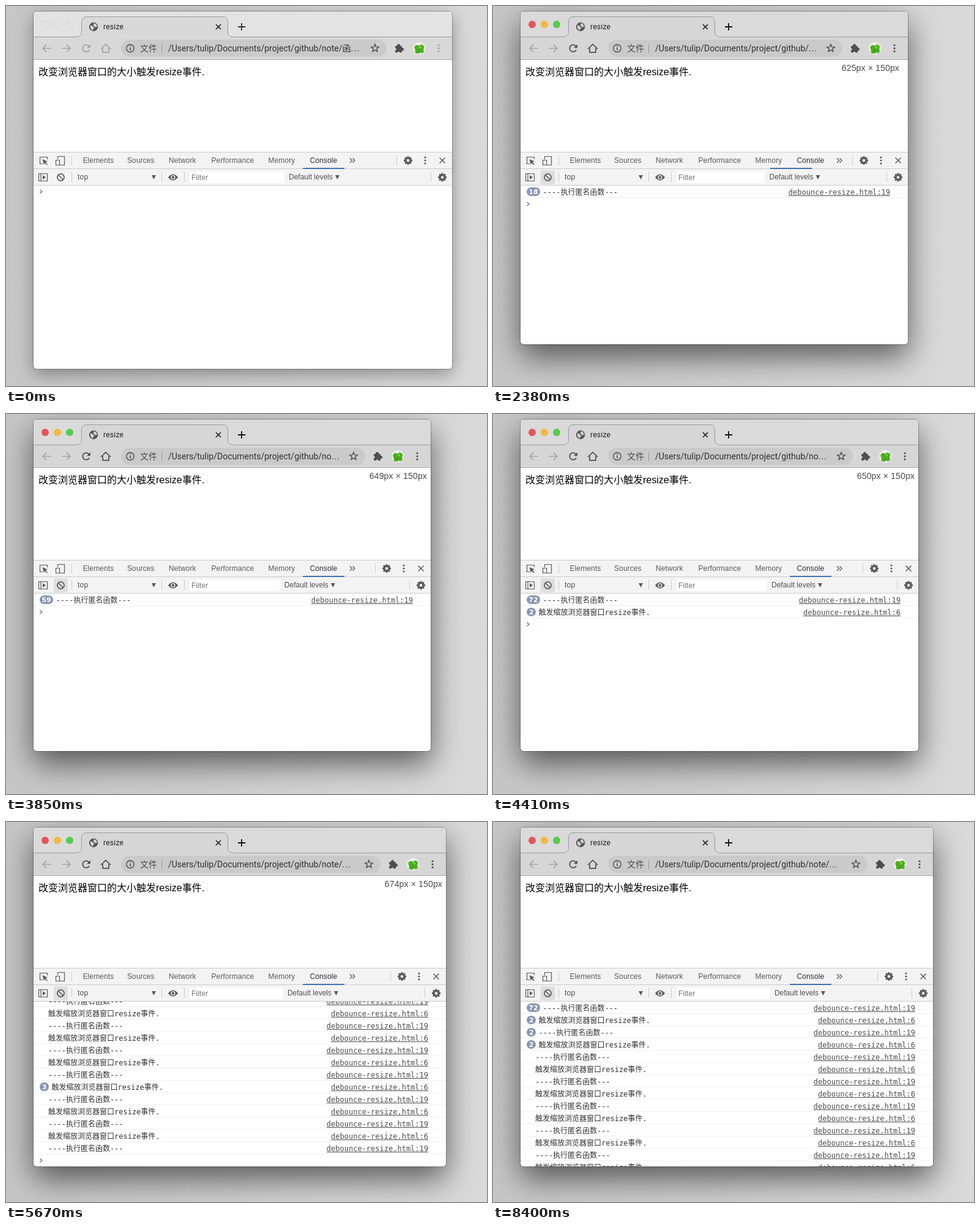
These frames come from a looping animation (786 px wide and 620 px high, 8.47 s). An HTML page with a canvas:

```html
<!DOCTYPE html>
<html lang="zh">
<head>
<meta charset="utf-8">
<title>resize</title>
<style>
html, body { margin: 0; width: 786px; height: 620px; overflow: hidden; background: #cfcfcf; }
canvas { display: block; }
</style>
</head>
<body>
<canvas id="stage" width="786" height="620"></canvas>
<script>
const ctx = document.getElementById('stage').getContext('2d');
const LOOP = 8470, STEP = 70, TAU = Math.PI * 2;
const LEFT = 45, TOP = 9, LIST = 293, ROW = 20;
const CJK = '"Noto Sans CJK SC", "Noto Sans CJK", sans-serif';
const UI = 'Roboto, ' + CJK;
const SANS = '"Liberation Sans", ' + CJK;
const MONO = '"DejaVu Sans Mono", "Noto Sans CJK SC", "Noto Sans CJK", monospace';
const PATH = '/Users/tulip/Documents/project/github/note/函数防抖';

// [time, value] pairs, straight between them
const RIGHT = [[1680, 729], [2030, 640], [2380, 678], [2660, 702], [3200, 688], [3710, 694], [3850, 694], [4550, 695], [4900, 710], [5600, 719]];
const BOTTOM = [[1680, 592], [2030, 556], [2380, 552], [3850, 550], [4550, 550], [4900, 555], [5600, 562]];
const CALLS = [[1680, 0], [2380, 18], [3850, 59], [4270, 72]];
const SCROLL = [[6230, 231], [6580, 93], [6930, 0]];
const BADGES = { 1: 2, 2: 2, 3: 2, 15: 3 };
const ROWS = 24;

const clamp = v => Math.max(0, Math.min(1, v));

function track(keys, t) {
  if (t <= keys[0][0]) return keys[0][1];
  for (let i = 1; i < keys.length; i++) {
    const [t0, a] = keys[i - 1], [t1, b] = keys[i];
    if (t <= t1) return a + (b - a) * (t - t0) / (t1 - t0);
  }
  return keys[keys.length - 1][1];
}

function text(s, x, y, font, color, align = 'left', gap = 0) {
  ctx.font = font;
  ctx.fillStyle = color;
  ctx.textAlign = align;
  ctx.letterSpacing = gap + 'px';
  ctx.fillText(s, x, y);
  ctx.letterSpacing = '0px';
}

function rect(x, y, w, h, color) {
  ctx.fillStyle = color;
  ctx.fillRect(x, y, w, h);
}

function round(x, y, w, h, r, color) {
  ctx.beginPath();
  ctx.roundRect(x, y, w, h, r);
  ctx.fillStyle = color;
  ctx.fill();
}

function dot(x, y, r, color) {
  ctx.beginPath();
  ctx.arc(x, y, r, 0, TAU);
  ctx.fillStyle = color;
  ctx.fill();
}

function ring(x, y, r, color, w, from = 0, to = TAU) {
  ctx.beginPath();
  ctx.arc(x, y, r, from, to);
  ctx.strokeStyle = color;
  ctx.lineWidth = w;
  ctx.stroke();
}

// flat list of coordinates
function trace(p, close) {
  ctx.beginPath();
  for (let i = 0; i < p.length; i += 2) ctx.lineTo(p[i], p[i + 1]);
  if (close) ctx.closePath();
}

function line(p, color, w, close) {
  trace(p, close);
  ctx.strokeStyle = color;
  ctx.lineWidth = w;
  ctx.stroke();
}

function poly(p, color) {
  trace(p, true);
  ctx.fillStyle = color;
  ctx.fill();
}

function cross(x, y, r, color, w) {
  line([x - r, y - r, x + r, y + r], color, w);
  line([x - r, y + r, x + r, y - r], color, w);
}

function kebab(x, y, color) {
  for (let i = -1; i < 2; i++) dot(x, y + i * 5, 1.6, color);
}

function gear(x, y) {
  const c = '#5c5c5c';
  ring(x, y, 4, c, 3.4);
  for (let i = 0; i < 8; i++) {
    const a = i * TAU / 8, dx = Math.cos(a), dy = Math.sin(a);
    line([x + dx * 5, y + dy * 5, x + dx * 7, y + dy * 7], c, 2.8);
  }
}

function star(x, y, color) {
  const p = [];
  for (let i = 0; i < 10; i++) {
    const a = i * TAU / 10 - TAU / 4, r = i % 2 ? 2.9 : 6.6;
    p.push(x + r * Math.cos(a), y + r * Math.sin(a));
  }
  line(p, color, 1.4, true);
}

function arrow(x, y, dir, color) {
  line([x - 6.5, y, x + 6.5, y], color, 1.7);
  line([x + dir, y - 6, x + dir * 6.8, y, x + dir, y + 6], color, 1.7);
}

function backdrop() {
  const g = ctx.createLinearGradient(0, 0, 786, 0);
  g.addColorStop(0, '#c6c6c6');
  g.addColorStop(0.5, '#d0d0d0');
  g.addColorStop(1, '#dadada');
  rect(0, 0, 786, 620, g);
}

function frame(R, B, active) {
  const w = R - LEFT, h = B - TOP;
  ctx.save();
  ctx.shadowColor = active ? 'rgba(0,0,0,.58)' : 'rgba(0,0,0,.36)';
  ctx.shadowBlur = active ? 50 : 28;
  ctx.shadowOffsetY = active ? 20 : 8;
  round(LEFT, TOP, w, h, 5, '#fff');
  ctx.restore();
  ctx.beginPath();
  ctx.roundRect(LEFT - .5, TOP - .5, w + 1, h + 1, 5.5);
  ctx.strokeStyle = 'rgba(0,0,0,.25)';
  ctx.lineWidth = 1;
  ctx.stroke();
}

function tabStrip(R, active) {
  const edge = '#9c9c9c', bar = active ? '#d6d6d6' : '#d8d8d8';
  rect(LEFT, TOP, R - LEFT, 42, active ? '#dadada' : '#e3e3e3');
  rect(LEFT, 51, R - LEFT, 37, bar);
  ctx.beginPath();
  ctx.moveTo(LEFT, 50.5);
  ctx.lineTo(114, 50.5);
  ctx.quadraticCurveTo(123.5, 50.5, 123.5, 42);
  ctx.lineTo(123.5, 26);
  ctx.quadraticCurveTo(123.5, 17.5, 132, 17.5);
  ctx.lineTo(354, 17.5);
  ctx.quadraticCurveTo(362.5, 17.5, 362.5, 26);
  ctx.lineTo(362.5, 42);
  ctx.quadraticCurveTo(362.5, 50.5, 372, 50.5);
  ctx.lineTo(R, 50.5);
  ctx.fillStyle = bar;
  ctx.fill();
  ctx.strokeStyle = edge;
  ctx.lineWidth = 1;
  ctx.stroke();

  ['#e2555a', '#efb83f', '#55cb4c'].forEach((c, i) => {
    if (active) dot(64 + i * 20, 30, 6, c);
    else ring(64 + i * 20, 30, 6, '#d3d3d3', 1);
  });

  dot(143, 34, 7.2, '#555');
  poly([138, 31, 142, 33, 144, 36, 141, 40, 138, 36], '#d6d6d6');
  poly([143, 28, 147, 29.5, 149, 34, 145, 34.5, 143, 31], '#d6d6d6');
  text('resize', 159, 38, '12px ' + UI, '#222', 'left', .25);
  cross(347, 34, 4, '#222', 1.7);
  const ink = active ? '#111' : '#333';
  line([379, 34, 391, 34], ink, 1.8);
  line([385, 28, 385, 40], ink, 1.8);
}

function address(R) {
  const limit = R - 147.5, x = 265, dots = 13;
  ctx.font = '14px ' + UI;
  let n = PATH.length;
  while (n && x + ctx.measureText(PATH.slice(0, n)).width + dots > limit) n--;
  const part = PATH.slice(0, n), w = ctx.measureText(part).width;
  text(part, x, 74, ctx.font, '#303030');
  text('...', x + w, 74, ctx.font, '#303030', 'left', 1);
}

function toolbar(R, active) {
  const dim = '#a3a3a3', ink = active ? '#4c4c4c' : dim, y = 69;
  arrow(67, y, -1, dim);
  arrow(98, y, 1, dim);
  ring(131, y, 5.7, ink, 1.8, .5, TAU - .7);
  poly([137.8, 62.5, 137.8, 68.2, 132, 68.2], ink);
  line([155, 70, 163, 62.5, 171, 70], ink, 1.7);
  line([158, 68.5, 158, 75.6, 168, 75.6, 168, 68.5], ink, 1.7);

  round(188, 55, R - 107 - 188, 28, 14, '#cacaca');
  ring(203, y, 6.2, '#4c4c4c', 1.4);
  rect(202.2, 68, 1.6, 4.5, '#4c4c4c');
  rect(202.2, 65, 1.6, 1.7, '#4c4c4c');
  text('文件', 219, 74, '14px ' + UI, '#4c4c4c');
  rect(254, 62, 1, 15, '#999');
  address(R);
  star(R - 126, y, '#4c4c4c');

  const px = R - 87;
  round(px - 6, 65, 11, 11, 1.5, '#4f4f4f');
  dot(px - .5, 64.5, 2.5, '#4f4f4f');
  dot(px + 5.5, 70.5, 2.5, '#4f4f4f');
  dot(px - 6, 70.5, 1.8, '#d6d6d6');
  dot(px - .5, 76, 1.8, '#d6d6d6');

  const cx = R - 54;
  dot(cx, y, 10, '#eef0ec');
  for (const [dx, dy, r] of [[-3.5, -1, 4.2], [3.5, -1.5, 4.6], [-2.5, 4.5, 4], [4, 4, 3.8]])
    dot(cx + dx, y + dy, r, '#4bae1c');
  dot(cx + 2, 67, 2.2, '#6fce35');
  line([cx, 71, cx - 1, 77], '#3b8f17', 1.3);

  kebab(R - 22, y, ink);
  rect(LEFT, 87, R - LEFT, 1, '#a8a8a8');
}

function devtools(R, active) {
  const w = R - LEFT, grey = '#5a5a5a', font = '12px ' + SANS;
  rect(LEFT, 238, w, 55, '#f3f3f3');
  for (const y of [238, 265, 292]) rect(LEFT, y, w, 1, '#cbcbcb');

  line([60, 257.5, 55.5, 257.5, 55.5, 246.5, 67.5, 246.5, 67.5, 250], grey, 1.2);
  poly([59.5, 250, 68, 253.5, 64.6, 255, 68, 258.5, 66.7, 259.6, 63.4, 256.2, 61.8, 259], grey);
  line([84.5, 250, 84.5, 245.5, 95.5, 245.5, 95.5, 259.5, 88, 259.5], grey, 1.2);
  line([81.5, 251.5, 87.5, 251.5, 87.5, 259.5, 81.5, 259.5], grey, 1.2, true);
  rect(107, 244, 1, 16, '#ccc');

  // a narrow window drops the Memory tab
  const wide = R > 672, slide = wide ? 0 : 68;
  const tabs = [['Elements', 125.5], ['Sources', 198], ['Network', 266], ['Performance', 335.5]];
  if (wide) tabs.push(['Memory', 428.5]);
  for (const [name, x] of tabs) text(name, x, 256, font, grey, 'left', .1);
  text('Console', 496.5 - slide, 256, font, '#303030', 'left', .1);
  rect(485 - 68 * clamp((685.5 - R) / 16), 264, 68, 2, '#4272b4');
  for (const x of [562, 566.5])
    line([x - slide, 248.3, x + 3.7 - slide, 252, x - slide, 255.7], grey, 1.3);
  rect(R - 91, 244, 1, 16, '#ccc');
  gear(R - 72, 252);
  kebab(R - 44, 252, grey);
  cross(R - 16, 252, 4.5, grey, 1.5);

  line([53.5, 273.5, 67.5, 273.5, 67.5, 285.5, 53.5, 285.5], grey, 1.2, true);
  line([57, 273.5, 57, 285.5], grey, 1.2);
  poly([60, 276, 65, 279.5, 60, 283], grey);
  if (active) rect(78, 268, 23, 23, '#dedede');
  ring(89.5, 279.5, 5.6, grey, 1.7);
  line([85.5, 275.5, 93.5, 283.5], grey, 1.7);
  for (const x of [107, 254, 291, R - 35]) rect(x, 271, 1, 16, '#ccc');
  text('top', 117, 283, font, '#505050', 'left', .2);
  poly([238, 276, 245, 276, 241.5, 283], grey);

  ctx.beginPath();
  ctx.moveTo(265, 279.5);
  ctx.quadraticCurveTo(273, 269.5, 281, 279.5);
  ctx.quadraticCurveTo(273, 289.5, 265, 279.5);
  ctx.fillStyle = grey;
  ctx.fill();
  ring(273, 279.5, 2.9, '#f3f3f3', 1.4);

  const lx = 462 - (729 - R) * .206;
  rect(300, 270, lx - 7.5 - 300, 19, '#fff');
  text('Filter', 303, 284, font, '#757575', 'left', .1);
  text('Default levels', lx, 283, font, '#505050');
  poly([lx + 76, 276, lx + 83, 276, lx + 79.5, 283], grey);
  gear(R - 16, 279.5);
}

function logRow(i, y, count, R) {
  const own = i % 2 === 0;
  let x = 69;
  if (count > 1) {
    const w = count > 9 ? 22 : 15;
    round(55, y + 3, w, 14, 7, '#8795b2');
    text(count, 55 + w / 2, y + 14.2, 'bold 11px "DejaVu Sans", sans-serif', '#fff', 'center');
    x = 55 + w + 4.5;
  }
  text(own ? '----执行匿名函数---' : '触发缩放浏览器窗口resize事件.', x, y + 15, '12px ' + MONO, '#303030');
  const link = 'debounce-resize.html:' + (own ? 19 : 6), end = R - 29;
  text(link, end, y + 15, '12px ' + MONO, '#4c4c4c', 'right');
  const w = ctx.measureText(link).width;
  rect(end - w, y + 16, w, 1, '#4c4c4c');
  rect(LEFT, y + 19, R - LEFT, 1, '#f0f0f0');
}

function consoleList(t, R, B) {
  const calls = Math.round(track(CALLS, t));
  let n = 0;
  while (n < ROWS && t >= 4280 + 68 * n) n++;
  if (calls && !n) n = 1;
  const scroll = t < SCROLL[0][0] ? Math.max(0, (n + 1) * ROW - (B - LIST)) : track(SCROLL, t);

  ctx.save();
  ctx.beginPath();
  ctx.rect(LEFT, LIST, R - LEFT, B - LIST);
  ctx.clip();
  for (let i = 0; i < n; i++) {
    const y = LIST + i * ROW - scroll;
    if (y > LIST - ROW && y < B) logRow(i, y, i ? BADGES[i] || 1 : calls, R);
  }
  const py = LIST + 10 + n * ROW - scroll;
  line([55.5, py - 3, 58.8, py, 55.5, py + 3], '#4b72b8', 1.4);

  if (t >= SCROLL[0][0]) {
    ctx.globalAlpha = clamp((7650 - t) / 250);
    round(R - 9, 297 + scroll * .54, 7, 148, 3.5, '#818181');
  }
  ctx.restore();
}

function draw(t) {
  const R = Math.round(track(RIGHT, t)), B = Math.round(track(BOTTOM, t));
  const active = t >= 1540;
  backdrop();
  frame(R, B, active);
  ctx.save();
  ctx.beginPath();
  ctx.roundRect(LEFT, TOP, R - LEFT, B - TOP, 5);
  ctx.clip();
  tabStrip(R, active);
  toolbar(R, active);
  text('改变浏览器窗口的大小触发resize事件.', 53, 113, '16px ' + SANS, '#000');
  if (t > 1700 && t < 6440) {
    // the size label trails the window by one step
    const w = Math.round(track(RIGHT, t - STEP)) - LEFT;
    text(w + 'px × 150px', LEFT + w - 6, 106, '14px ' + SANS, '#4a4a4a', 'right', .15);
  }
  devtools(R, active);
  consoleList(t, R, B);
  ctx.restore();
}

const start = performance.now();
function tick() {
  const t = (performance.now() - start) % LOOP;
  draw(Math.floor(t / STEP) * STEP);
  requestAnimationFrame(tick);
}
tick();
</script>
</body>
</html>
```
